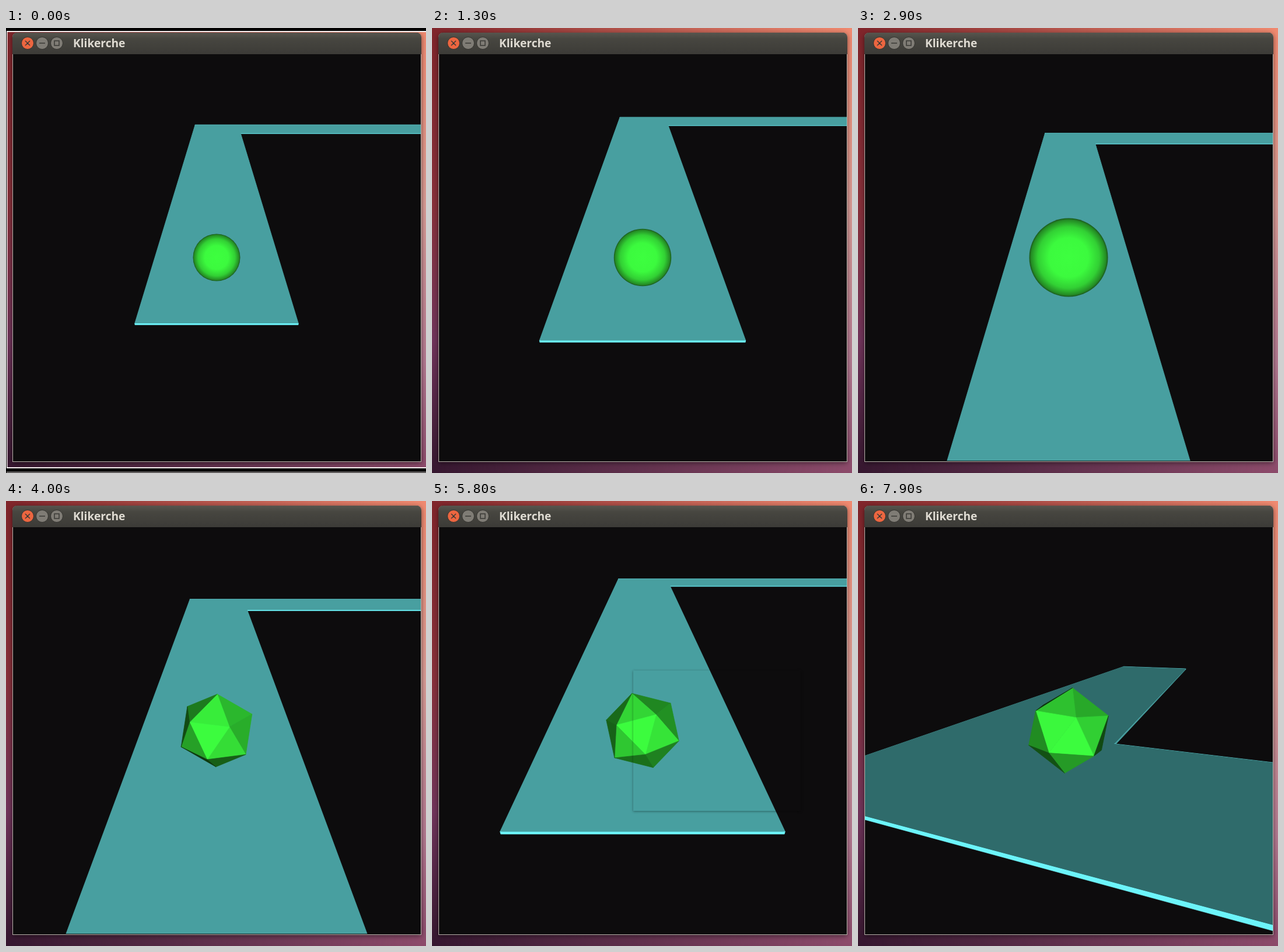
Write an HTML page with a canvas that moves like this. It is 720 px wide and 764 px high and loops after 8000 ms.

```html
<!DOCTYPE html>
<html lang="sr">
<head>
<meta charset="utf-8">
<title>Klikerche</title>
<style>
  html, body { margin: 0; width: 100%; height: 100%; overflow: hidden; }
  body { position: relative; background: #3a1a35; }
  div, canvas, svg { position: absolute; box-sizing: border-box; }
  #desktop, #glow { inset: 0; }
  #desktop { background: linear-gradient(#80252b, #87303a 40%, #70345a 70%, #35172f); }
  #glow {
    background: linear-gradient(#f08a70, #d89c96 40%, #b47a92 75%, #8c4a6a);
    mask-image: linear-gradient(90deg, transparent, #000);
  }
  #window {
    left: 11px; top: 8px; width: 701px; height: 737px;
    border: 1px solid #b9b3ab; border-top: 0; border-radius: 8px 8px 0 0;
    background: #0d0c0d; box-shadow: 0 2px 8px rgba(0, 0, 0, .5);
  }
  #bar {
    left: 11px; top: 8px; width: 701px; height: 37px; border-radius: 8px 8px 0 0;
    background: linear-gradient(#57554e, #474640 30%, #3c3b37);
  }
  #title {
    left: 115px; top: 12px; color: #dfdbd2;
    font: bold 19.2px/28px "Open Sans", "Noto Sans", sans-serif;
  }
  #view { left: 12px; top: 45px; }
  #shade, #menu { left: 345px; top: 291px; width: 287px; height: 241px; }
  #shade { box-shadow: 0 1px 4px rgba(0, 0, 0, .4); }
  #menu {
    border: 2px solid; border-color: #eee #777 #777 #eee; background: #b2b2b2;
    font: 24px/32.4px "Liberation Sans", Arial, sans-serif; color: #000;
    white-space: nowrap; -webkit-text-stroke: .4px #000;
  }
  #menu p { margin: 0; padding-left: 3px; height: 33.8px; }
  #menu p.on { background: #fff; }
  #frame {
    inset: 0; border: solid #000; border-width: 5px 0 8px 1px;
    box-shadow: inset 1.5px 2px #f4eeee, inset 0 -2px #f4eeee;
  }
  #frame::after {
    content: ""; position: absolute; left: 0; right: 0; bottom: -7px;
    height: 1.5px; background: #d8d2d2;
  }
</style>
</head>
<body>
<div id="desktop"></div>
<div id="glow"></div>
<div id="window"></div>
<div id="bar"></div>
<svg width="110" height="45" fill="none" stroke="#3a3935" stroke-width="1.5">
  <g stroke="#34332f" stroke-width="1">
    <circle cx="37" cy="26" r="10.5" fill="#ec6640"/>
    <circle cx="62" cy="26" r="10.5" fill="#7f7c75"/>
    <circle cx="87" cy="26" r="10.5" fill="#7f7c75"/>
  </g>
  <path d="M33 22l8 8m0-8l-8 8M57 26h10M83 22h8v8h-8z"/>
</svg>
<div id="title">Klikerche</div>
<canvas id="view" width="699" height="698"></canvas>
<div id="shade"></div>
<div id="menu">
  <p>Resetuj oko (R)</p>
  <p>Promeni rezim prikaza (F)</p>
  <p>Promeni rezim crtanja (G)</p>
  <p>Sacuvaj igru (K)</p>
  <p>Ucitaj igru (L)</p>
  <p>Pauziraj igru (P)</p>
  <p>Izadji iz igre (Esc)</p>
</div>
<div id="frame"></div>
<script>
const LOOP = 8000, LOAD = 7000;
const CENTER = { x: 349, y: 349 };
const FOCAL = 349 * Math.sqrt(3);           // 60 degree field of view
const BALL_RADIUS = .335, GROUND = -.352;   // the world is centred on the ball
const SLAB = .026, TRACK_WIDTH = 2, BRANCH_END = 30, NEAR_PLANE = .1;
const EDGE = '#6cf4fa', SIDE = '#489fa0';

const $ = id => document.getElementById(id);
const ctx = $('view').getContext('2d');
const rows = [...document.querySelectorAll('#menu p')];

const mix = (a, b, k) => a + (b - a) * k;
const ramp = (t, from, to) => Math.max(0, Math.min(1, (t - from) / (to - from)));
const radians = degrees => degrees * Math.PI / 180;

// The picture moves in bursts: four 100 ms steps, then a rest, every 500 ms.
function stepTime(t) {
  const start = 300 + 500 * Math.floor((t - 300) / 500);
  return start + 100 * Math.min(3, Math.floor((t - start) / 100));
}

// Height of the ball in two equal hops; the game is paused in mid-air.
function hop(t) {
  const played = t - 500 * ramp(t, 3100, 3600);
  const hops = (played - 2150) / 1200;
  const p = hops % 1;
  return hops > 0 && hops < 2 ? 4.48 * p * (1 - p) : 0;
}

function toCamera([x, y, z], { yaw, pitch, distance }) {
  const side = x * Math.cos(yaw) + z * Math.sin(yaw);
  const ahead = z * Math.cos(yaw) - x * Math.sin(yaw);
  return [
    side,
    -y * Math.cos(pitch) - ahead * Math.sin(pitch),
    distance + ahead * Math.cos(pitch) - y * Math.sin(pitch)
  ];
}

function clipNear(points) {
  return points.flatMap((a, i) => {
    const b = points[(i + 1) % points.length];
    const kept = a[2] >= NEAR_PLANE ? [a] : [];
    if ((a[2] < NEAR_PLANE) !== (b[2] < NEAR_PLANE)) {
      const k = (NEAR_PLANE - a[2]) / (b[2] - a[2]);
      kept.push(a.map((v, j) => mix(v, b[j], k)));
    }
    return kept;
  });
}

function polygon(points, color, outline = 0) {
  ctx.beginPath();
  points.forEach(([x, y]) => ctx.lineTo(CENTER.x + x, CENTER.y + y));
  ctx.closePath();
  ctx.fillStyle = ctx.strokeStyle = color;
  ctx.fill();
  if (outline) {
    ctx.lineWidth = outline;
    ctx.stroke();
  }
}

function drawFace(points, camera, color, outline) {
  const visible = clipNear(points.map(p => toCamera(p, camera)));
  polygon(visible.map(([x, y, z]) => [FOCAL * x / z, FOCAL * y / z]), color, outline);
}

function drawTrack(corners, height, camera, color) {
  const at = ([x, z], drop = 0) => [x, GROUND - height - drop, z];
  corners.forEach((a, i) => {
    const b = corners[(i + 1) % corners.length];
    drawFace([at(a), at(b), at(b, SLAB), at(a, SLAB)], camera, a[1] === b[1] ? EDGE : SIDE, .6);
  });
  drawFace(corners.map(c => at(c)), camera, color);
}

// A straight track with a branch to the right at its far end or its near end.
function trackCorners(left, near, far, branchFar) {
  const right = left + TRACK_WIDTH;
  const inner = branchFar ? far - TRACK_WIDTH : near + TRACK_WIDTH;
  const branch = [[BRANCH_END, branchFar ? far : inner], [BRANCH_END, branchFar ? inner : near]];
  return branchFar
    ? [[left, near], [left, far], ...branch, [right, inner], [right, near]]
    : [[left, near], [left, far], [right, far], [right, inner], ...branch];
}

function drawSphere(r) {
  const { x, y } = CENTER;
  const shade = ctx.createRadialGradient(x, y, 0, x, y, r);
  [[0, '#3dff3f'], [.5, '#3cfa3e'], [.78, '#32d034'], [.95, '#248c24'], [1, '#1b571e']]
    .forEach(stop => shade.addColorStop(...stop));
  ctx.beginPath();
  ctx.arc(x, y, r, 0, 2 * Math.PI);
  ctx.fillStyle = shade;
  ctx.fill();
}

const dot = (a, b) => a[0] * b[0] + a[1] * b[1] + a[2] * b[2];
const cross = (a, b) => [a[1] * b[2] - a[2] * b[1], a[2] * b[0] - a[0] * b[2], a[0] * b[1] - a[1] * b[0]];

// (x, y) is the vertex nearest the viewer, turn the angle of the rest about it.
function icosahedron([x, y, turn]) {
  const pole = [x, y, Math.sqrt(1 - x * x - y * y)];
  const a = radians(turn);
  let u = [Math.cos(a), Math.sin(a), 0];
  u[2] = -dot(u, pole) / pole[2];
  const length = Math.hypot(...u);
  u = u.map(n => n / length);
  const v = cross(pole, u);
  const half = [pole];
  for (let k = 0; k < 5; k++) {
    const w = k * 2 * Math.PI / 5;
    half.push(pole.map((n, i) => (n + 2 * (u[i] * Math.cos(w) + v[i] * Math.sin(w))) / Math.sqrt(5)));
  }
  return half.concat(half.map(p => p.map(n => -n)));
}

function drawGem(r, pose) {
  const points = icosahedron(pose);
  const joined = (a, b) => dot(a, b) > .4;
  points.forEach((a, i) => points.slice(i + 1).forEach((b, j) => {
    if (!joined(a, b)) return;
    points.slice(i + j + 2).forEach(c => {
      if (!joined(a, c) || !joined(b, c)) return;
      const facing = (a[2] + b[2] + c[2]) / 3 / .795;
      if (facing <= 0) return;
      const light = Math.min(1, .18 + .9 * facing);
      const color = `rgb(${[60, 252, 62].map(n => Math.round(n * light))})`;
      polygon([a, b, c].map(p => [r * p[0], r * p[1]]), color, .7);
    });
  }));
}

const mixPose = (a, b, k) => a.map((v, i) => mix(v, b[i], k));

function drawFirstGame(t) {
  const roll = ramp(t, 3600, 5100);
  const advance = 2.3 * Math.sin(Math.PI * roll) - .19 * roll;
  const distance = mix(5, 3, ramp(t, 740, 2000));
  const camera = { yaw: 0, pitch: radians(30), distance };
  drawTrack(trackCorners(-1, -1 - advance, 13 - advance, true), hop(t), camera, '#489fa0');

  const r = FOCAL * BALL_RADIUS / distance;
  const tumble = (Math.max(3600, Math.min(5100, t)) - 4000) / 1100;
  if (t < 3400) drawSphere(r);
  else drawGem(r, mixPose([.328, -.09, -98.3], [.343, -.403, -119], tumble));
}

function drawLoadedGame(t) {
  const orbit = .6 * ramp(t, 7200, 7500) + .4 * ramp(t, 7700, 7900);
  const camera = { yaw: radians(mix(32.5, 22.4, orbit)), pitch: radians(15.4), distance: 2.72 };
  drawTrack(trackCorners(-1.87, -1.11, 9.4, false), 0, camera, '#2f6b6b');
  drawGem(FOCAL * BALL_RADIUS / camera.distance, mixPose([.03, -.22, -80], [.17, -.3, -89], orbit));
}

function drawMenu(t) {
  const open = t >= 5800 && t < LOAD + 100;
  const chosen = t < 6300 ? -1 : Math.min(4, 2 + Math.floor((t - 6300) / 100));
  $('shade').style.visibility = open ? 'visible' : 'hidden';
  $('menu').style.opacity = open ? ramp(t, 5800, 6000) * (t < LOAD ? 1 : .9) : 0;
  rows.forEach((row, i) => row.classList.toggle('on', i === chosen));
}

function render(time) {
  const t = stepTime(time);
  ctx.fillStyle = '#0d0c0d';
  ctx.fillRect(0, 0, 699, 698);
  if (t < LOAD) drawFirstGame(t);
  else drawLoadedGame(t);
  drawMenu(t);
  $('frame').style.visibility = t < 300 ? 'visible' : 'hidden';
}

const began = performance.now();
function tick() {
  render((performance.now() - began) % LOOP);
  requestAnimationFrame(tick);
}
tick();
</script>
</body>
</html>
```
